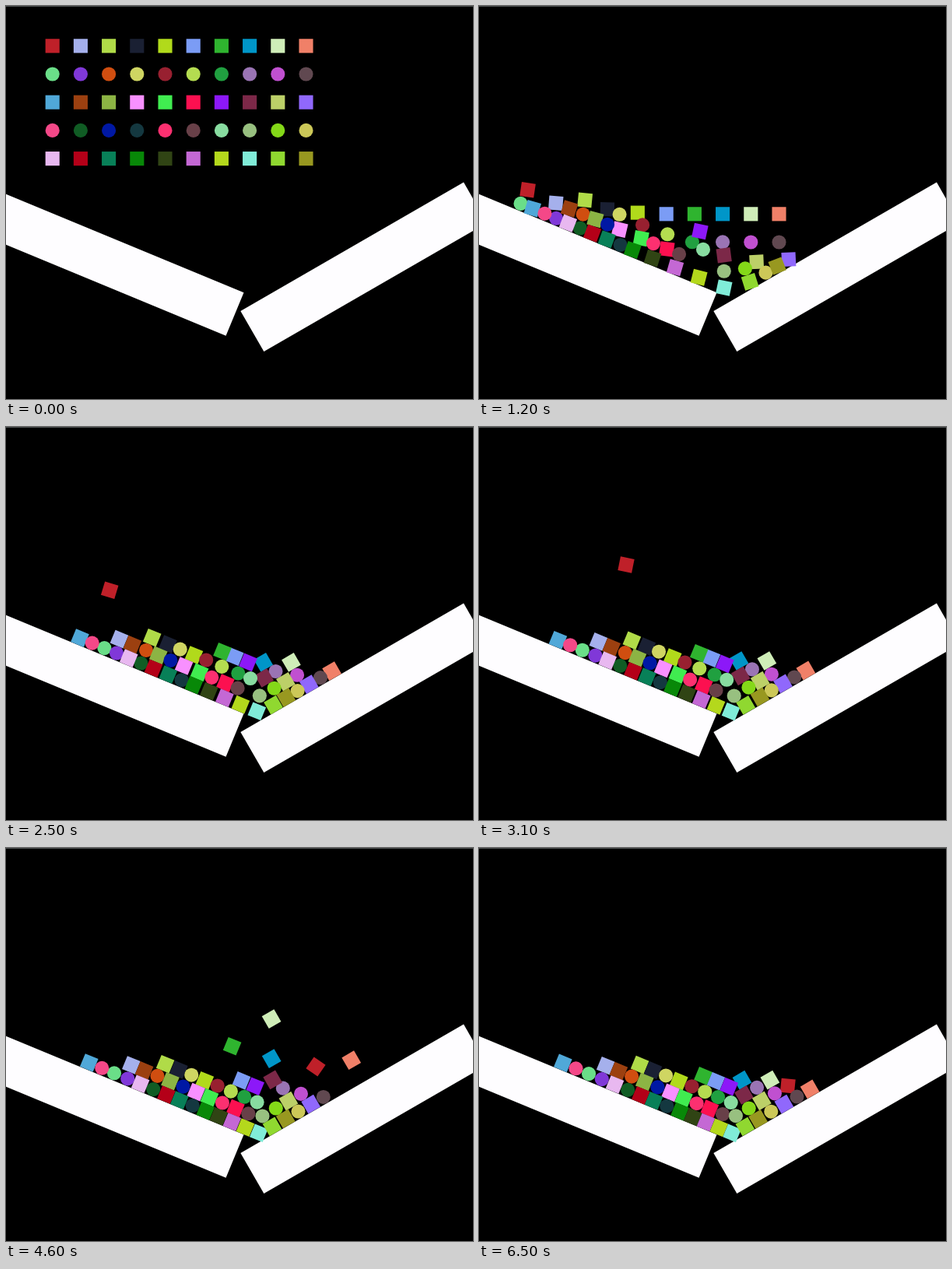
An HTML page with a canvas for the animation above (6600 ms loop, 600x505 px).

```html
<!DOCTYPE html>
<html lang="en">
<head>
<meta charset="utf-8">
<title>Falling blocks</title>
<style>
  html, body { margin: 0; width: 100%; height: 100%; overflow: hidden; background: #000; }
  canvas { display: block; }
</style>
</head>
<body>
<canvas id="stage" width="600" height="505"></canvas>
<script>
const ctx = document.getElementById('stage').getContext('2d');
const LOOP = 6600, STEP = 100;
const SIZE = 18.1, GAP = 36.2, PITCH = 16.7;
const HALF_G = 150; // px per second squared
const LEFT = Math.PI / 8, RIGHT = -Math.PI / 6;

const colors = `
  bf2029 a5b0ec b0db48 1a2033 b1da1b 7b9cf5 2fb42f 0096c8 cfedb8 f08068
  6ade88 8038d8 d04e10 cfd562 982030 b4dc50 20a040 9a74b4 c050d0 604850
  50a8d8 9c4010 8cb444 f890ff 40ec50 fc1050 8c18f8 7c2848 bcd068 9068fc
  f44888 105c24 0018a4 143840 fc3070 684048 88dca0 98c080 84d818 ccc858
  e8b8f0 b40018 088058 088808 304414 c468d4 b4d81c 80ecd8 90d830 989820
`.trim().split(/\s+/).map(c => '#' + c);

// The resting pile, layer by layer from the ramps up, each from left to right.
const layers = [
  { x: 108, ids: [20, 30, 10, 11, 40, 31, 41, 42, 33, 43, 44, 45, 46, 47, 48, 49, 39, 29, 19, 9] },
  { x: 163, ids: [1, 21, 12, 22, 32, 23, 24, 34, 25, 35, 37, 38, 28, 18, 0] },
  { x: 207, ids: [2, 3, 13, 4, 14, 15, 16, 36, 27, 17, 8] },
  { x: 288, ids: [6, 5, 26, 7] }
];

// The first square is picked up and thrown; its landing tosses a few others.
const THROWN = 0, GRAB = 1.9, TOP = 3.1, CRASH = 4.6, SETTLE = 5.7;
const hops = [
  { id: 6, dx: 3, h: 38 }, { id: 7, dx: 4, h: 28 }, { id: 8, dx: -32, h: 79 },
  { id: 9, dx: 20, h: 38 }, { id: 27, dx: 3, h: 20 }
];

const leftTop = x => 241.8 + Math.tan(LEFT) * x;
const rightTop = x => 566.1 + Math.tan(RIGHT) * x;
const surface = x => Math.min(leftTop(x), rightTop(x));
const tilt = x => leftTop(x) < rightTop(x) ? LEFT : RIGHT;

const isSquare = i => Math.floor(i / 10) % 2 === 0;
const smooth = u => u * u * (3 - 2 * u);

const bodies = colors.map((color, i) => ({
  color,
  square: isSquare(i),
  x: 59.7 + GAP * (i % 10),
  y: 51.3 + GAP * Math.floor(i / 10)
}));

layers.forEach(({ x, ids }, level) => ids.forEach((id, n) => {
  const restX = x + PITCH * n, angle = tilt(restX);
  const lift = (9.3 + 17.9 * level) / Math.cos(angle);
  Object.assign(bodies[id], { restX, angle, lift });
}));

// Free fall to the ramp or pile, then a slowing slide along the slope.
function drop(body, restX, t) {
  const hit = Math.sqrt((surface(body.x) - body.lift - body.y) / HALF_G);
  if (t < hit) return { x: body.x, y: body.y + HALF_G * t * t, a: 0 };
  const slide = t - hit;
  const x = body.x + (restX - body.x) * (1 - Math.exp(-slide));
  return { x, y: surface(x) - body.lift, a: body.angle * (1 - Math.exp(-5 * slide)) };
}

function thrown(body, t) {
  const start = drop({ ...body, angle: LEFT }, 92, Math.min(t, GRAB));
  if (t <= GRAB) return start;
  const path = [
    [GRAB, start],
    [TOP, { x: 189, y: 177, a: 0.2 }],
    [CRASH, { x: 398, y: 281, a: 0.6 }],
    [SETTLE, { x: body.restX, y: surface(body.restX) - body.lift, a: 0.1 }]
  ];
  const n = path.findIndex(([end]) => t < end);
  if (n < 0) return path[path.length - 1][1];
  const [begin, p] = path[n - 1], [end, q] = path[n];
  const k = smooth((t - begin) / (end - begin));
  const mix = key => p[key] + (q[key] - p[key]) * k;
  return { x: mix('x'), y: mix('y'), a: mix('a') };
}

// Push overlapping neighbours apart and keep all of them on the ramps.
function separate(poses) {
  const room = 17;
  for (let pass = 0; pass < 10; pass++) {
    poses.forEach((p, i) => {
      for (const q of poses.slice(i + 1)) {
        const dx = q.x - p.x, dy = q.y - p.y;
        const d = Math.hypot(dx, dy) || 1;
        if (d >= room) continue;
        const push = (room - d) / 2 / d;
        p.x -= dx * push;
        p.y -= dy * push;
        q.x += dx * push;
        q.y += dy * push;
      }
    });
    for (const p of poses) {
      p.y = Math.min(p.y, surface(p.x) - 9.3 / Math.cos(tilt(p.x)));
    }
  }
}

function arrange(t) {
  const poses = bodies.map((body, i) =>
    i === THROWN ? thrown(body, t) : drop(body, body.restX, t));
  for (const { id, dx, h } of hops) {
    const k = Math.max(0, 1 - HALF_G * (t - CRASH) ** 2 / h);
    poses[id].x += dx * k;
    poses[id].y -= h * k;
  }
  separate(poses);
  return poses;
}

function ramp(x, y, angle, from, to) {
  ctx.save();
  ctx.translate(x, y);
  ctx.rotate(angle);
  ctx.fillRect(from, 0, to - from, 60);
  ctx.restore();
}

function draw(t) {
  ctx.fillStyle = '#000';
  ctx.fillRect(0, 0, 600, 505);
  ctx.fillStyle = '#484c4c';
  ctx.fillRect(0, 0, 600, 1);

  ctx.fillStyle = '#fefdff';
  ramp(305.5, 368.3, LEFT, -400, 0);
  ramp(588, 226.6, RIGHT, -331, 0);

  arrange(t).forEach(({ x, y, a }, i) => {
    ctx.save();
    ctx.translate(x, y);
    ctx.fillStyle = bodies[i].color;
    if (bodies[i].square) {
      ctx.rotate(a);
      ctx.fillRect(-SIZE / 2, -SIZE / 2, SIZE, SIZE);
    } else {
      ctx.beginPath();
      ctx.arc(0, 0, SIZE / 2, 0, 2 * Math.PI);
      ctx.fill();
    }
    ctx.restore();
  });
}

const begin = performance.now();
function tick() {
  const ms = (performance.now() - begin) % LOOP;
  draw(Math.floor(ms / STEP) * STEP / 1000);
  requestAnimationFrame(tick);
}
tick();
</script>
</body>
</html>
```
